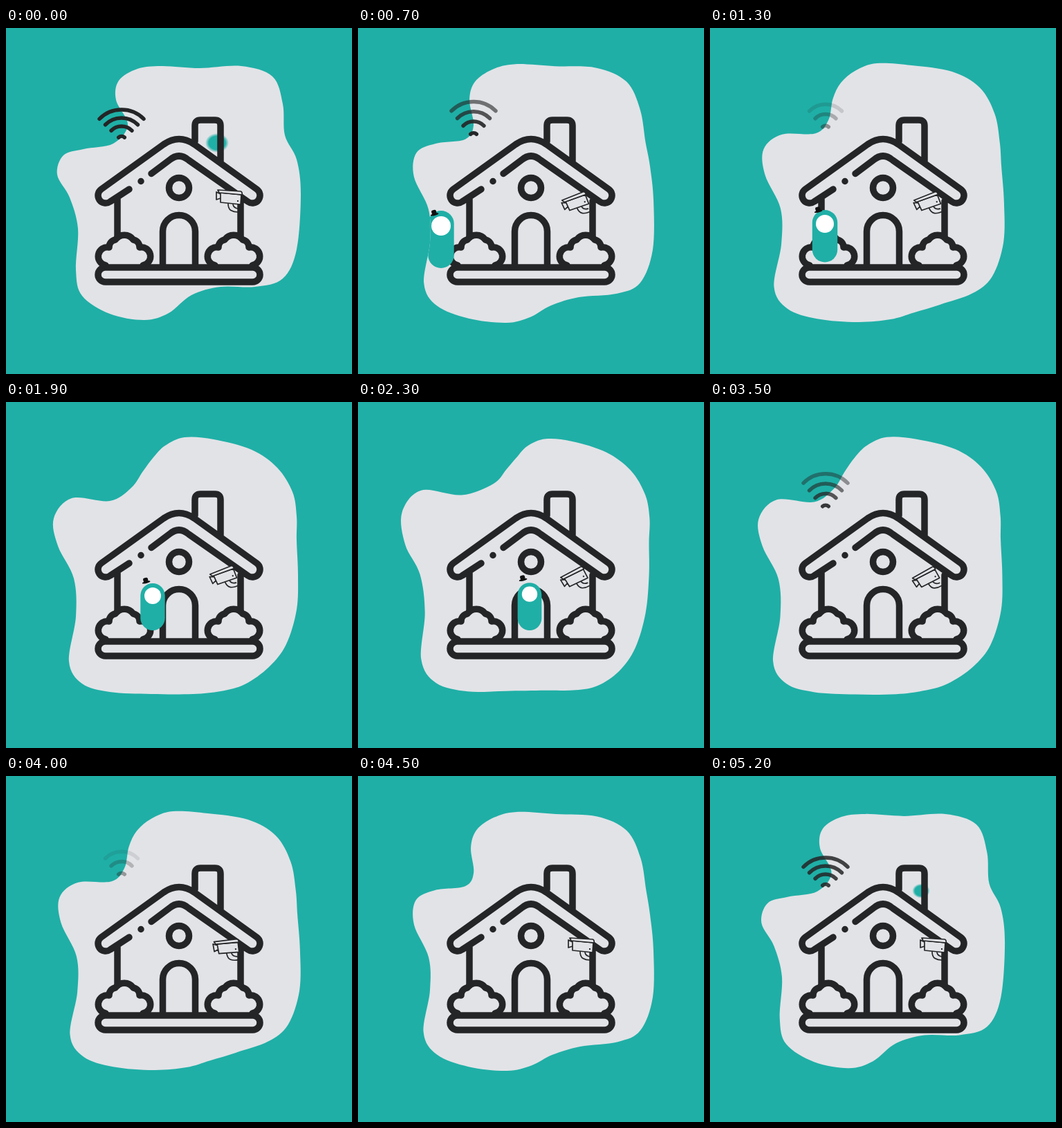
Recreate the animation shown at these times as an HTML page with a canvas. Size 500 by 500 pixels, loop 5.3 s.

```html
<!DOCTYPE html>
<html lang="en">
<head>
<meta charset="utf-8">
<title>Smart home</title>
<style>
html, body { margin: 0; height: 100%; overflow: hidden; background: #1fafa6; }
canvas { display: block; width: 500px; height: 500px; }
</style>
</head>
<body>
<canvas id="stage" width="500" height="500"></canvas>
<script>
const ctx = document.getElementById('stage').getContext('2d');
const LOOP = 5300, HALF = LOOP / 2, STEP = 100;
const TEAL = '#1fafa6', PALE = '#e2e3e7', INK = '#242526';

// Blob outlines, clockwise from the notch at the upper left
const blobStart = [176,140, 159,104, 163,76, 190,59, 225,55, 280,58, 340,55, 385,70, 400,110, 403,155,
  420,190, 426,240, 420,320, 400,362, 360,374, 310,374, 268,386, 235,412, 200,422, 150,413,
  110,387, 101,350, 104,290, 92,245, 74,212, 83,184, 112,175, 155,167];
const blobWide = [167,140, 162,104, 170,78, 195,60, 228,52, 285,55, 345,58, 388,78, 408,118, 416,165,
  422,200, 427,250, 426,320, 408,368, 375,384, 320,390, 280,402, 250,418, 215,426, 160,420,
  114,402, 95,370, 104,310, 102,262, 81,215, 84,180, 112,166, 155,160];
const blobRound = [181,124, 198,100, 213,80, 230,63, 258,51, 300,54, 355,69, 392,95, 414,130, 420,165,
  420,200, 422,250, 420,300, 405,350, 380,383, 345,408, 310,418, 270,422, 210,422, 150,419,
  110,407, 91,375, 101,310, 98,255, 75,208, 69,168, 95,139, 150,143];
const blobEnd = [205,115, 222,97, 237,80, 252,64, 278,55, 315,59, 360,74, 395,100, 415,135, 422,170,
  421,205, 420,250, 413,310, 398,360, 375,393, 345,410, 315,414, 270,413, 215,415, 165,418,
  115,405, 92,370, 94,300, 84,245, 64,205, 61,155, 90,122, 150,130];
const blobTimes = [0, 750, 1900, HALF];
const blobShapes = [blobStart, blobWide, blobRound, blobEnd];

const clamp = v => Math.max(0, Math.min(1, v));
const mix = (a, b, k) => a + (b - a) * k;
const smooth = k => k * k * (3 - 2 * k);

function track(keys, t, ease = k => k) {
  for (let i = 1; i < keys.length; i++) {
    const [t0, a] = keys[i - 1], [t1, b] = keys[i];
    if (t <= t1) return mix(a, b, ease(clamp((t - t0) / (t1 - t0))));
  }
  return keys[keys.length - 1][1];
}

function hermite(times, values, t) {
  let i = 0;
  while (i < times.length - 2 && t > times[i + 1]) i++;
  const slope = j => j === 0 || j === times.length - 1 ? 0
    : (values[j + 1] - values[j - 1]) / (times[j + 1] - times[j - 1]);
  const span = times[i + 1] - times[i], k = (t - times[i]) / span;
  return mix(values[i], values[i + 1], smooth(k))
    + span * k * (1 - k) * ((1 - k) * slope(i) - k * slope(i + 1));
}

function blobPath(t) {
  const phase = t > HALF ? LOOP - t : t;
  const c = blobStart.map((_, j) => hermite(blobTimes, blobShapes.map(s => s[j]), phase));
  const n = c.length / 2;
  const at = i => { const j = (i + n) % n * 2; return [c[j], c[j + 1]]; };
  const path = new Path2D();
  path.moveTo(...at(0));
  for (let i = 0; i < n; i++) {
    const [p, a, b, q] = [at(i - 1), at(i), at(i + 1), at(i + 2)];
    path.bezierCurveTo(a[0] + (b[0] - p[0]) / 6, a[1] + (b[1] - p[1]) / 6,
      b[0] - (q[0] - a[0]) / 6, b[1] - (q[1] - a[1]) / 6, b[0], b[1]);
  }
  path.closePath();
  return path;
}

const BUSH = 'M144 343 A13 13 0 0 1 149 317 A11 11 0 0 1 158 306 A16 16 0 0 1 184 306 A11 11 0 0 1 193 317 A13 13 0 0 1 198 343';
const house = new Path2D([
  'M143.5 346 H356.5 A10.5 10.5 0 0 1 356.5 367 H143.5 A10.5 10.5 0 0 1 143.5 346 Z',
  'M178 233 L150.4 251 A11 11 0 0 1 137.6 233 L228 168 Q250 153 272 168 L362.4 233 A11 11 0 0 1 349.6 251',
  'L264 191 Q250 179 236 191 L210 210.5 M195 221.5 h0.01',
  'M273 164 V141 Q273 133 281 133 H302 Q310 133 310 141 V194',
  'M264.5 231 A14.5 14.5 0 1 1 235.5 231 A14.5 14.5 0 1 1 264.5 231',
  'M226.5 345 V294 A23.5 23.5 0 0 1 273.5 294 V345',
  'M161 247 V303 M339 250 V303'
].join(' '));
const bush = new Path2D(BUSH);

function drawHouse() {
  ctx.strokeStyle = INK;
  ctx.lineWidth = 9.5;
  ctx.lineCap = ctx.lineJoin = 'round';
  ctx.stroke(house);
  for (const dx of [0, 158]) {
    ctx.save();
    ctx.translate(dx, 0);
    ctx.stroke(bush);
    ctx.restore();
  }
}

function drawHole(t) {
  const size = 1 - Math.min(t, LOOP - t) / 400;
  if (size <= 0) return;
  ctx.save();
  ctx.translate(305, 166);
  ctx.scale(size * 17, size * 14);
  const glow = ctx.createRadialGradient(0, 0, 0.7, 0, 0, 1);
  glow.addColorStop(0, TEAL);
  glow.addColorStop(1, 'rgba(31,175,166,0)');
  ctx.fillStyle = glow;
  ctx.beginPath();
  ctx.arc(0, 0, 1, 0, 7);
  ctx.fill();
  ctx.restore();
}

function drawWifi(t) {
  const p = t % HALF;
  const returning = p > 2200;
  ctx.save();
  ctx.strokeStyle = INK;
  ctx.lineWidth = 5.5;
  ctx.lineCap = 'round';
  [45, 33, 21, 6.5].forEach((r, i) => {
    const rise = returning ? 0 : Math.max(0, 0.0175 * (p - 40 - i * 130));
    ctx.globalAlpha = returning ? clamp((p - 2350) / 235) : clamp(1 - (p - 300 - i * 150) / 1000);
    const spread = i === 3 ? 0.72 : 0.79;
    ctx.beginPath();
    ctx.arc(167, 163 - rise, r, -Math.PI / 2 - spread, -Math.PI / 2 + spread);
    ctx.stroke();
  });
  ctx.restore();
}

const cameraKeys = [[100, 0], [650, 25], [1900, 25], [2650, 37], [3500, 33], [4300, 0]];
const cameraBody = new Path2D('M310 238 L340 241 L339 255 L310 252 Z M310 240 L304 237 V248 L310 246 Z');
const cameraTop = new Path2D('M306 234 L339 236 Q342 237 341 241 L308 238 Z');
const bracket = new Path2D('M321 254 Q321 261 325 263.5 T335 266 M328 255 Q329 260 335 261');

function drawCamera(t) {
  ctx.save();
  ctx.translate(334, 267);
  ctx.rotate(-track(cameraKeys, t, smooth) * Math.PI / 180);
  ctx.translate(-334, -267);
  ctx.strokeStyle = INK;
  ctx.fillStyle = PALE;
  ctx.lineWidth = 1.7;
  ctx.stroke(bracket);
  for (const part of [cameraBody, cameraTop]) {
    ctx.fill(part);
    ctx.stroke(part);
  }
  ctx.fillStyle = INK;
  ctx.fillRect(334, 249, 2, 2);
  ctx.restore();
}

const walkKeys = [[300, 86], [700, 120], [1900, 212], [2700, 284], [2900, 302]];

function drawVisitor(t, blob) {
  if (t < 250 || t > 2900) return;
  const x = track(walkKeys, t);
  const near = (212 - x) / 92;
  const halfWidth = 17.7 + near;
  const top = 262 + 2 * near, bottom = 330 + 17 * Math.max(near, 0);
  ctx.save();
  ctx.clip(blob);
  ctx.beginPath();
  ctx.rect(0, 0, 270, 500);
  ctx.clip();
  ctx.fillStyle = TEAL;
  ctx.beginPath();
  ctx.roundRect(x - halfWidth, top, halfWidth * 2, bottom - top, halfWidth);
  ctx.fill();
  ctx.fillStyle = '#fff';
  ctx.beginPath();
  ctx.arc(x, 280 + 6 * near, 12 + 2 * near, 0, 7);
  ctx.fill();
  ctx.translate(x - 10, 258 + 9 * near);
  ctx.rotate(-0.25);
  ctx.fillStyle = '#111';
  ctx.beginPath();
  ctx.ellipse(0, 2.5, 6, 1.6, 0, 0, 7);
  ctx.roundRect(-3.5, -4, 7, 6, 2);
  ctx.fill();
  ctx.restore();
}

function draw(t) {
  const blob = blobPath(t);
  ctx.fillStyle = TEAL;
  ctx.fillRect(0, 0, 500, 500);
  ctx.fillStyle = PALE;
  ctx.fill(blob);
  drawHole(t);
  drawHouse();
  drawWifi(t);
  drawVisitor(t, blob);
  drawCamera(t);
}

const begin = performance.now();
function tick() {
  const t = (performance.now() - begin) % LOOP;
  draw(Math.floor(t / STEP) * STEP);
  requestAnimationFrame(tick);
}
tick();
</script>
</body>
</html>
```
